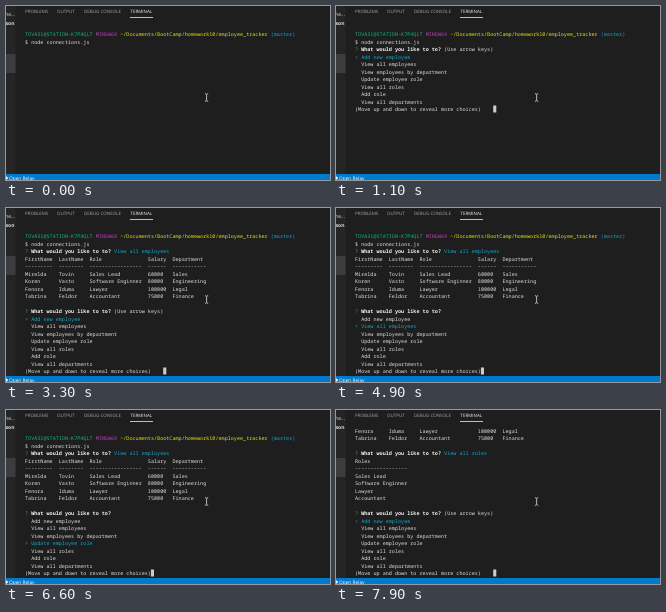
Recreate the animation shown at these times as an HTML page. Size 324 by 174 pixels, loop 8 s.

```html
<!DOCTYPE html>
<html lang="en">
<head>
<meta charset="utf-8">
<title>Employee tracker in a terminal</title>
<style>
  html, body { margin: 0; width: 100%; height: 100%; overflow: hidden; background: #1e1e1e; }
  body { position: relative; text-rendering: geometricPrecision; }
  body > * { position: absolute; }
  svg { left: 0; top: 0; }
  svg text { font-family: "Open Sans", "Noto Sans", sans-serif; }
  pre {
    left: 19px; top: 17.25px; margin: 0;
    transform: scale(.1); transform-origin: 0 0;
    font: 51.2px/75px "Noto Sans Mono", "DejaVu Sans Mono", monospace; color: #e0e0e0;
  }
  b { color: #f2f2f2; }
  .green { color: #0dbc79; }
  .magenta { color: #bc3fbc; }
  .yellow { color: #e5e510; }
  .cyan { color: #11a8cd; }
  .cursor { display: inline-block; width: 1ch; height: 70px; vertical-align: top; background: #ccc; }
</style>
</head>
<body>
<svg width="324" height="174" viewBox="0 0 324 174">
  <rect width="9.5" height="168" fill="#252526"/>
  <rect y="48" width="9.5" height="19" fill="#3c3c3f"/>
  <g fill="#ddd" text-anchor="end">
    <text x="9" y="9.5" font-size="5">he...</text>
    <text x="8.5" y="19" font-size="5" font-weight="bold">son</text>
  </g>
  <g font-size="4.5" fill="#a8a8a8">
    <text x="19" y="6.9">PROBLEMS</text>
    <text x="51" y="6.9">OUTPUT</text>
    <text x="78" y="6.9">DEBUG CONSOLE</text>
    <text x="124.5" y="6.9" fill="#f2f2f2">TERMINAL</text>
  </g>
  <rect x="124" y="11" width="23" height=".8" fill="#e7e7e7"/>
  <rect y="168" width="324" height="6" fill="#007acc"/>
  <circle cx=".3" cy="172" r="1.5" fill="#fff"/>
  <text x="3" y="174" font-size="4.8" fill="#fff">Open Relay</text>
</svg>
<pre id="terminal"></pre>
<svg width="324" height="174" viewBox="0 0 324 174">
  <path d="M199 87.8h1.1l.5.5.5-.5h1.1M199 95.2h1.1l.5-.5.5.5h1.1M200.6 88.3v6.4" fill="none" stroke="#ddd" stroke-width=".8"/>
</svg>
<script>
const LOOP = 8000;
const ROWS = 20;
const CHOICES = ['Add new employee', 'View all employees', 'View employees by department',
  'Update employee role', 'View all roles', 'Add role', 'View all departments'];

const paint = (color, text) => `<span class="${color}">${text}</span>`;
const question = paint('green', '?') + ' <b>What would you like to to?</b> ';
const answer = choice => question + paint('cyan', CHOICES[choice]);

function table(rows) {
  const widths = rows[0].map((_, col) => Math.max(...rows.map(row => row[col].length)));
  const [head, ...body] = rows;
  return [head, widths.map(w => '-'.repeat(w)), ...body]
    .map(row => row.map((cell, col) => cell.padEnd(widths[col])).join('  '));
}

function menu(selected, untouched) {
  return [
    question + (untouched ? '(Use arrow keys)' : ''),
    ...CHOICES.map((choice, i) => i === selected ? paint('cyan', '&gt; ' + choice) : '  ' + choice),
    '(Move up and down to reveal more choices)' + (untouched ? '    ' : '') + '<span class="cursor"></span>'
  ];
}

const start = ['',
  [paint('green', 'TOVA31@STATION-K7P4QLT'), paint('magenta', 'MINGW64'),
    paint('yellow', '~/Documents/BootCamp/homework10/employee_tracker'), paint('cyan', '(master)')].join(' '),
  '$ node connections.js'];

const employees = [...start, answer(1), ...table([
  ['FirstName', 'LastName', 'Role', 'Salary', 'Department'],
  ['Mirelda', 'Tovin', 'Sales Lead', '60000', 'Sales'],
  ['Koren', 'Vasto', 'Software Enginner', '80000', 'Engineering'],
  ['Fenora', 'Iduma', 'Lawyer', '100000', 'Legal'],
  ['Tabrina', 'Feldor', 'Accountant', '75000', 'Finance']
]), ''];

const roles = [...employees, answer(4), ...table([
  ['Roles'], ['Sales Lead'], ['Software Enginner'], ['Lawyer'], ['Accountant']
]), ''];

// [start time in ms, terminal lines]
const screens = [
  [0, start],
  [1000, [...start, ...menu(0, true)]],
  [2400, [...start, ...menu(1)]],
  [2800, [...employees, ...menu(0, true)]],
  [4900, [...employees, ...menu(1)]],
  [5400, [...employees, ...menu(2)]],
  [5700, employees],
  [5800, [...employees, ...menu(3)]],
  [7300, [...employees, ...menu(4)]],
  [7600, [...roles, ...menu(0, true)]]
];

const terminal = document.getElementById('terminal');
const origin = performance.now();
let shown;

function draw() {
  const time = (performance.now() - origin) % LOOP;
  const lines = screens.findLast(([from]) => from <= time)[1];
  if (lines !== shown) {
    terminal.innerHTML = lines.slice(-ROWS).join('\n');
    shown = lines;
  }
  requestAnimationFrame(draw);
}
draw();
</script>
</body>
</html>
```
